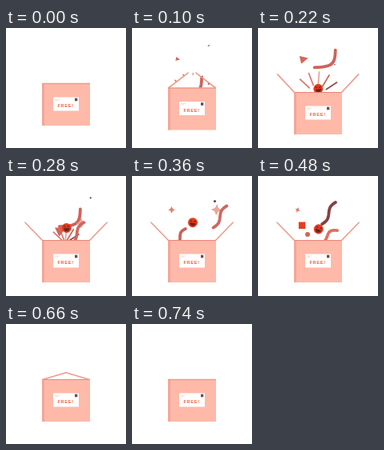
These frames come from a looping animation (150x150 px, 0.76 s). An HTML page:

```html
<!DOCTYPE html>
<html lang="en">
<head>
<meta charset="utf-8">
<title>Free box</title>
<style>
html, body { margin: 0; width: 100%; height: 100%; overflow: hidden; background: #fff; }
svg { display: block; width: 100vw; height: 100vh; }
text { font: bold 5.5px "Liberation Sans", Arial, sans-serif; letter-spacing: .8px; fill: #e9623f; }
</style>
</head>
<body>
<svg viewBox="0 0 150 150">
  <g id="toys" fill="none" stroke-linecap="round"></g>
  <g id="box">
    <rect x="45" width="60" height="53" fill="#feb9a9"/>
    <rect x="45" width="3" height="53" fill="#f5a595"/>
    <path d="M45 .5H105" stroke="#ea8575"/>
    <g transform="translate(75 26)">
      <rect x="-16" y="-8.5" width="32" height="17" fill="#fff"/>
      <path d="M-14 -6h6M-14 -4.6h4" stroke="#ecccc4" stroke-width=".6"/>
      <rect x="11" y="-7.3" width="3.3" height="3.6" fill="#74484a"/>
      <text x="-10.6" y="4">FREE!</text>
    </g>
    <path id="flaps" fill="none" stroke="#ee9b8c" stroke-width="1.6" stroke-linecap="round"/>
  </g>
</svg>
<script>
const LOOP = 760, STEP = 20;
const $ = id => document.getElementById(id);
const set = (el, attrs) => { for (const k in attrs) el.setAttribute(k, attrs[k]); };
const make = (tag, attrs, parent = $("toys")) => {
  const el = document.createElementNS("http://www.w3.org/2000/svg", tag);
  set(el, attrs);
  parent.append(el);
  return el;
};
const rad = deg => deg * Math.PI / 180;
const ramp = (t, a, b) => Math.max(0, Math.min(1, (t - a) / (b - a)));
const smooth = p => p * p * (3 - 2 * p);
const out = p => 1 - (1 - p) ** 2;
const hump = (p, power = .8) => Math.sin(Math.PI * p) ** power;

const actors = [];
function actor(el, from, to, draw) {
  actors.push(t => {
    const on = t > from && t < to;
    el.style.display = on ? "" : "none";
    if (on) draw((t - from) / (to - from));
  });
  return el;
}

// Leaves the box, peaks at (x, y) halfway through and drops back in.
function toss(tag, attrs, from, to, x, y, spin = 0, size = () => 1) {
  const el = make(tag, attrs);
  return actor(el, from, to, p => {
    const h = hump(p);
    set(el, { transform: `translate(${75 + (x - 75) * h} ${85 + (y - 85) * h}) rotate(${spin * (p - .3)}) scale(${size(p)})` });
  });
}

// A strip turned by angle, bent by one bow and one full wave.
function ribbon(stroke, from, to, x, y, { angle = -58, length = 32, bow = 0, wave = 2.5, width = 3.8 } = {}) {
  const points = Array.from({ length: 17 }, (_, i) => {
    const s = i / 16;
    return [(s - .5) * length, bow * (Math.sin(Math.PI * s) - .5) + wave * Math.sin(2 * Math.PI * s)];
  });
  const strip = toss("g", { stroke, "stroke-width": width }, from, to, x, y);
  make("path", { d: "M" + points.join("L"), transform: `rotate(${angle})`, "stroke-linejoin": "round" }, strip);
}

function star(k) {
  const c = k * .16;
  return `M0 ${-k}Q${c} ${-c} ${k} 0Q${c} ${c} 0 ${k}Q${-c} ${c} ${-k} 0Q${-c} ${-c} 0 ${-k}Z`;
}

// Rays: dots shoot out in a fan, then stretch into lines
["#d9776a", "#d9776a", "#eba195", "#c8665a", "#8f4a47"].forEach((stroke, i) => {
  const a = rad(-47 + 26 * i), ray = make("path", { stroke, "stroke-width": 1.7 });
  actor(ray, 40, 300, p => {
    const tip = 31 * hump(p, .3), tail = Math.max(0, tip - 33 * p * p);
    const at = r => `${74 + r * Math.sin(a)} ${84 - r * Math.cos(a)}`;
    set(ray, { d: `M${at(tip)}L${at(tail)}` });
  });
});

// First burst
ribbon("#7d5552", 40, 160, 96, 22, { angle: -40, length: 2, wave: 0, width: 1 });
ribbon("#cf625a", 90, 330, 87, 42, { angle: -40, length: 34, bow: 10, wave: -1 });
toss("path", { d: "M-3-6L6 1L-5 4Z", fill: "#d5665b" }, 20, 300, 53, 29, -60, p => .2 + 1.1 * p);

// Second burst
toss("circle", { r: 1.6, fill: "#614052" }, 160, 460, 107, 25, 0, p => .3 + p);
toss("path", { d: star(5), fill: "#dc8474" }, 280, 560, 44, 33, 60, p => 1.1 - .5 * p);
toss("path", { d: star(6), fill: "#f0a596", stroke: "#e08b7b", "stroke-width": .7 }, 240, 460, 106, 42, 20);
ribbon("#cc6a60", 260, 460, 110, 51);
ribbon("#c9645a", 300, 420, 60, 77, { length: 26 });
ribbon("#87403f", 380, 580, 88.5, 46.5);
ribbon("#8f4a45", 520, 640, 69, 72, { angle: -30, length: 24, bow: -9, wave: 0 });
ribbon("#e0705f", 420, 540, 88, 75, { angle: -38, length: 26, bow: -3 });
toss("circle", { r: 3, fill: "#dc6253" }, 400, 560, 62, 73);
toss("path", { d: "M-4.2-4.2h8.4v8.4h-8.4z", fill: "#ea3c20" }, 410, 650, 51, 57, 44);
toss("path", { d: star(5.5), fill: "#ed3f22", stroke: "#ed3f22", "stroke-width": 1.4 }, 510, 650, 87, 67);

// Smiling ball
const face = toss("g", {}, 190, 560, 76, 58, 40);
make("circle", { r: 6, fill: "#e93a1d" }, face);
make("path", { d: "M-3.8.3H3.8Q3 4.4 0 4.4T-3.8.3Z", fill: "#652523" }, face);
make("path", { d: "M-3.3-1.5q1-1.6 2 0M1.3-1.5q1-1.6 2 0", stroke: "#652523" }, face);

function render(t) {
  actors.forEach(f => f(t));
  const y = 69 + 11 * (smooth(ramp(t, 0, 200)) - out(ramp(t, 540, 640)));
  const a = rad(134 * (smooth(ramp(t, 30, 230)) - smooth(ramp(t, 535, 695))));
  const dx = 31 * Math.cos(a), dy = -31 * Math.sin(a);
  set($("box"), { transform: `translate(0 ${y})` });
  set($("flaps"), { d: `M45.5 .5l${dx} ${dy}M104.5 .5l${-dx} ${dy}` });
}

const start = performance.now();
function frame() {
  const t = (performance.now() - start) % LOOP;
  render(Math.floor(t / STEP) * STEP);
  requestAnimationFrame(frame);
}
frame();
</script>
</body>
</html>
```
